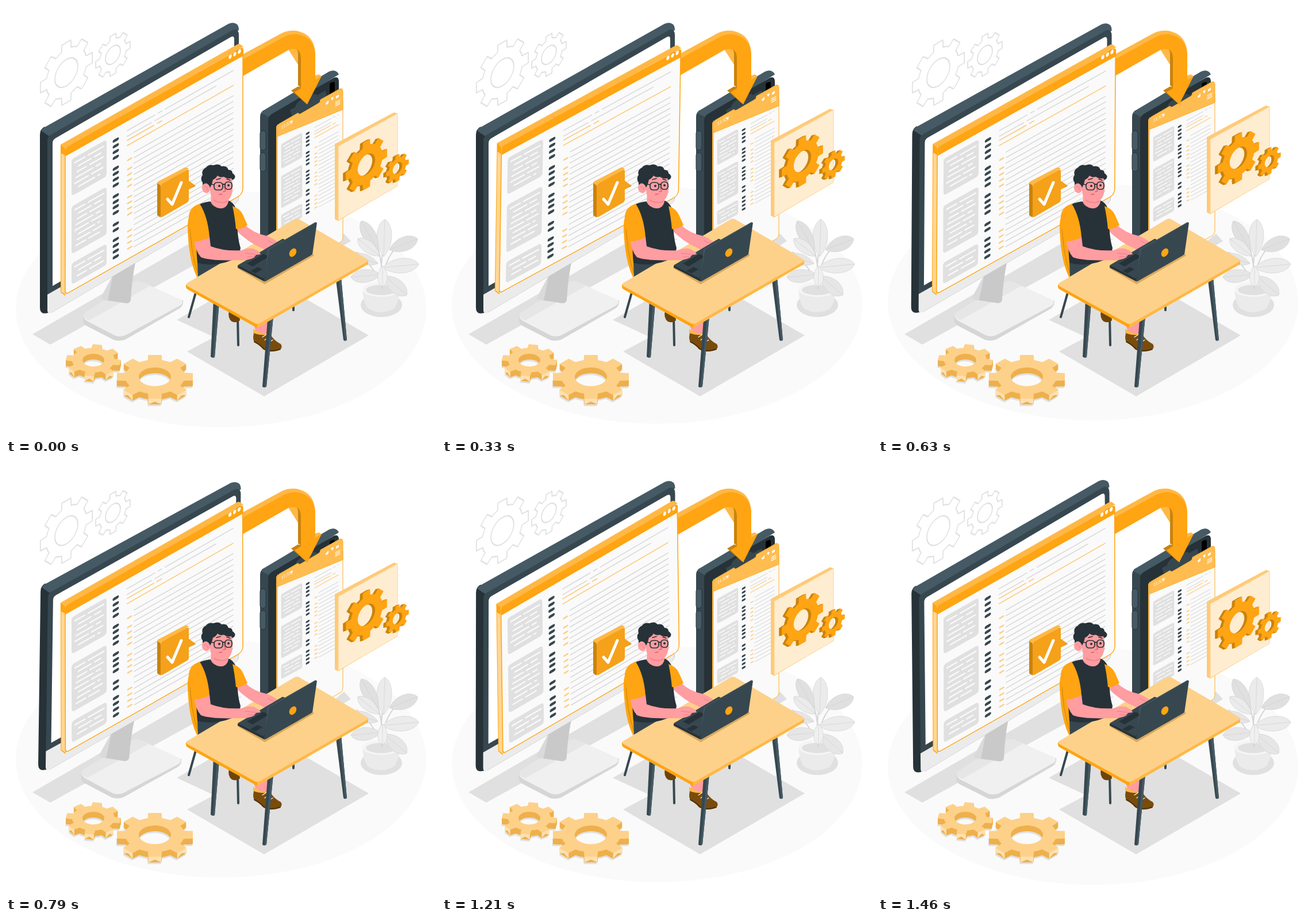
An HTML page for the animation above (1.5 s loop, 748x748 px).

```html
<!DOCTYPE html>
<html lang="en">
<head>
<meta charset="utf-8">
<title>Responsive page</title>
<style>
html, body { margin: 0; width: 100%; height: 100%; overflow: hidden; background: #fff }
svg { display: block; width: 100%; height: 100% }
.o { fill: #ffa412 } .l { fill: #ffb846 } .b { fill: #c9830f }
.d { fill: #263238 } .m { fill: #37474f } .t { fill: #455a64 }
.s { fill: #ff9da1 } .g { fill: #e0e0e0 } .p { fill: #fafafa }
.line { fill: none; stroke-linecap: round; stroke-linejoin: round }
</style>
</head>
<body>
<svg viewBox="0 0 748 748">
  <ellipse class="p float" cx="374" cy="527" rx="357" ry="206"/>
  <g id="outlines" fill="#fff" stroke="#e0e0e0" stroke-width="2" stroke-linejoin="round"></g>

  <g class="g">
    <path d="M46 571L340 401 410 405 77 589z"/>
    <path d="M297 546L405 484 500 497 631 573 449 679 315 601 362 576z"/>
    <path d="M560 420L588 396 600 409 575 424z"/>
  </g>

  <g id="monitor">
    <path fill="#d6d6d6" d="M134 538v11q1 5 9 9l45 23q10 3 20-1l94-54q7-5 6-14z"/>
    <path fill="#f0f0f0" d="M137 534L221 481q8-4 17 0l65 29q8 5 0 11l-94 51q-10 5-20 1l-48-25q-10-7-4-14z"/>
    <path fill="#e6e6e6" d="M137 534L221 481q8-4 17 0l12 6-105 60q-14-5-8-13z"/>
    <path fill="#dadada" d="M186 468L165 507q-1 4 8 5l36 5q7 0 8-6 2-36 8-65z"/>
    <path fill="#c9c9c9" d="M186 468L177 512l32 5q7 0 8-6 2-36 8-65z"/>
    <path class="d" d="M59 224q0-10 8-14l9 12V533q-17 6-17-8z"/>
    <path class="t" d="M61 217q2-4 6-6L387 31q9-4 15 1 3 3 3 10L76 227z"/>
    <path class="m" d="M72 234q0-7 6-10L394 42q11-4 11 9V331q0 8-6 12L80 531q-8 4-8-4z"/>
    <path fill="#fff" d="M81 239q0-6 5-9L391 54q6-3 6 4V306L81 487z"/>
    <path fill="#ebebeb" d="M72 502L405 311v20q0 8-6 13L80 533q-8 4-8-4z"/>
    <path class="line" stroke="#ccc" stroke-width=".7" d="M80 533L399 344q6-5 6-13"/>
  </g>

  <path class="m" d="M442 193q0-7 5-11l20-4 10 300-35-40z"/>
  <path class="t" d="M444 186q1-3 5-5L562 114q12-5 17 5L459 194z"/>
  <path class="d" d="M456 199q0-7 6-11L570 125q9-4 9 7V398L456 470z"/>
  <path fill="#000" d="M563 142v-5q0-3 3-4l4-1q2 0 2 3v20l-9 5z"/>
  <path class="m" d="M494 181l9-5q2-8 9-12l17-9q8-4 12 0l15-8 2 13-60 34z"/>
  <g class="t" stroke="#263238">
    <rect x="442" y="217" width="10" height="34" rx="5"/>
    <rect x="442" y="255" width="10" height="33" rx="5"/>
  </g>

  <g class="float">
    <path class="l" d="M473 205l-3 5V470h5z"/>
    <path class="p" stroke="#ffb030" d="M472 224L586 165V403q0 5-4 8L472 475z"/>
    <path fill="#ffbc50" stroke="#ffae2c" d="M472 211q0-4 3-6l33-19q1 3 5 1l31-18q3-2 3-6l32-18q7-4 7 4v31L472 227z"/>
    <g id="phonePage" transform="matrix(.6 -.33 0 .68 472 226)"></g>
    <text transform="matrix(.866 -.48 0 1 479 214)" font-family="Lato, sans-serif" font-size="7.5" fill="#fff">11:53</text>
    <path fill="#fff" d="M493 202l6-4-2 8-1-4zM556 169l5-5v5l-4 3zM565 161q3-4 5-2l-2 5zM574 157l5-3v4l-5 3z"/>
    <path class="line" stroke="#fff" stroke-width="1.2" d="M573 168l8-4.500M573 171l8-4.500M573 174l8-4.500"/>
  </g>

  <path class="l" d="M403 89L480 47Q504 37 524 51 538 62 538 86L513 110 490 74 403 122z"/>
  <path class="b" d="M508 138V84q0-9-6-11l-6-1 12-6 8 12v66z"/>
  <path class="b" d="M496 147l12-7 8 2 9 29-4-2z"/>
  <path class="o" d="M403 98L485 53Q503 45 519 53 538 62 538 88V128l11-6-25 49-22-21 11-7V92Q513 70 492 76L403 127z"/>
  <path class="l" d="M538 121l6-2 5 3-11 6z"/>

  <g id="window">
    <path class="o" d="M95 241L103 246V504l-8-6z"/>
    <path fill="#ffd694" d="M96 256l7 4V502l-7-5z"/>
    <path class="l" d="M95 241L402 67q3-2 6 0l5 4-310 177z"/>
    <g transform="matrix(1 -.567 0 1 103 247)">
      <path class="p" stroke="#ffa412" stroke-width="1.500" d="M0 14H309V245q0 10-9 10H6q-6 0-6-6z"/>
      <path class="o" d="M0 14V4q0-4 4-4H305q5 0 5 5V15z"/>
      <g fill="#fff"><ellipse cx="287" cy="4" rx="2.700" ry="3.500"/><ellipse cx="295" cy="4" rx="2.700" ry="3.500"/><ellipse cx="303" cy="4" rx="2.700" ry="3.500"/></g>
      <g id="windowPage"></g>
    </g>
  </g>

  <path class="b" d="M263 308l6 3v57l-6-4zM318 306l12 7-12 6z"/>
  <path class="l" d="M263 308q0-2 2-3l46-24q3-1 7 2l-49 29z"/>
  <path fill="#f5a11a" d="M269 314q0-3 3-5l43-24q3-1 3 2v17l11 8-11 7v18q0 3-3 5l-43 25q-3 1-3-2z"/>
  <path class="line" stroke="#fff" stroke-width="5" d="M281 336l8 9 16-38"/>

  <g class="float">
    <path fill="#ffca78" d="M572 240L675 185l6 2V312l-103 62-6-3z"/>
    <path fill="#ffedd1" stroke="#ffd494" d="M578 244L681 187V313L578 373z"/>
    <g id="panelGears"></g>
  </g>

  <ellipse class="g" cx="653" cy="520" rx="36" ry="21"/>
  <path fill="#ebebeb" d="M620 492q2 28 11 35 21 11 43 0 9-9 12-35z"/>
  <ellipse fill="#f5f5f5" cx="653" cy="493" rx="33" ry="13"/>
  <ellipse class="g" cx="653" cy="494" rx="27" ry="9"/>
  <g id="plant"></g>
  <g id="floorGears"></g>

  <path class="line" stroke="#37474f" stroke-width="4" d="M333 488L318 541M403 540l1 50M500 515v14"/>
  <path class="o" d="M341 344Q314 352 316 390q2 45 12 72l6 14 38 8z"/>
  <path class="line" stroke="#c9830f" d="M320 366q-1 60 16 105"/>
  <path class="m" d="M333 446l74-14 12 42-55 24-30-27z"/>
  <path fill="#6d440b" d="M388 530q-3 13 5 19 8 3 14-2l-2-17z"/>
  <path class="s" d="M428 548l28-4-2 27-18-2z"/>
  <path class="l" d="M430 562l16 8 12-3-2 11-26-9z"/>
  <path fill="#7a4c0c" d="M431 569q-3 13 3 17 9 5 13 11 12 7 27 2 9-4 4-11-12-6-19-18-11 5-28-1z"/>
  <path class="line" stroke="#4f3208" stroke-width="2" d="M432 584q10 5 16 12 13 7 29 1"/>
  <path class="line" stroke="#fff" stroke-width="1.200" d="M446 576l9-6M450 581l9-6M455 586l9-5"/>

  <g class="m">
    <path d="M361 510l10 6-8 95q-4 2-7-1zM455 545l10-5-12 122q-4 3-7 0zM574 477l9-5 10 109q-3 3-6 0z"/>
    <path class="t" d="M367 512l4 2-8 97-3 1zM461 542l4-2-12 122-3 1zM579 475l4-3 10 109-3 1z"/>
  </g>
  <path class="o" d="M313 484l124 68v8L316 493q-3-2-3-5z"/>
  <path class="l" d="M437 552l193-110v7L437 560z"/>
  <path fill="#fdd18a" d="M315 482L502 371q4-2 8 0l118 69q3 3 0 5L441 552q-4 2-8 0L315 487q-3-3 0-5z"/>
  <path fill="#d9a95c" d="M402 456l48 28 86-50-6-7z"/>

  <path class="s" d="M399 389l17-8q14 14 38 19 11 4 20 12l-5 4-6-2-3 8q-8 5-15-1-23-9-46-32z"/>
  <path class="d" d="M403 452L482 405l5 3-34 70-4 1-46-24z"/>
  <path class="m" d="M403 451L481 405l5 3-38 66z"/>
  <path class="d" d="M419 448l29-17 9 5-28 17zM425 461l13-7 8 4-12 7z"/>
  <path class="d" d="M336 345q12-5 22-5 14 14 28-2 10 3 14 15 0 22 3 40 1 15 5 28l-3 15q-35 20-72 11-3-30 0-45z"/>
  <path class="s" d="M327 406l27-5 2 17q24 9 54 7 10-5 20-3 11 4 13 10l-8 1-4 5q-10 5-24 4-50 2-68-5-9-10-12-31z"/>
  <path class="line" stroke="#e87f87" d="M416 430l18 2M420 436l12 1M456 408l9 5"/>
  <path class="o" d="M337 344q-19 6-19 24 1 24 9 41 13 1 27-7-3-36-17-58zM394 348q14 5 18 15l8 18q-8 7-20 7-2-22-6-40z"/>
  <path class="s" d="M357 325l29 3 1 12q-3 13-15 12-12-2-16-11z"/>
  <path fill="#f48088" d="M361 336q12 6 25 1l-1 4q-13 4-23-2z"/>
  <path class="d" d="M354 319q-13 1-12-12-5-7 0-13-3-9 6-13 4-6 13-4 9-4 14 2 9-2 12 6 7 0 7 6 7 4 3 10l-9 4-30 2z"/>
  <path class="s" d="M357 302q-5 18 1 31 8 9 20 8 14-2 16-21 1-12-2-21l-27-5z"/>
  <path class="d" d="M353 319l3-19 10-10 26 2 3 7q-10 3-16-2-7 2-11-2-4 6-8 7-2 9-4 12z"/>
  <ellipse class="s" cx="348" cy="317" rx="7" ry="8.500" transform="rotate(-15 348 317)"/>
  <path class="line" stroke="#e87f87" d="M345 314q5 0 6 6"/>
  <g class="line" stroke="#263238" stroke-width="1.700">
    <rect x="362" y="307" width="15" height="13" rx="5"/><rect x="381" y="306" width="12" height="13" rx="5"/>
    <path d="M377 311q2-2 4 0M362 311l-9-2M366 302l7-2M384 301l6 2"/>
  </g>
  <circle class="d" cx="371" cy="313" r="2"/><circle class="d" cx="387" cy="312" r="2"/>
  <path class="line" stroke="#d85f6a" stroke-width="1.300" d="M379 314l3 8-4 1M371 328l5-1"/>

  <path class="t" d="M455 426q0-3 3-4L538 376l3 1-8 55-83 47z"/>
  <path class="m" d="M457 426q0-2 3-4L537 378q4-2 3 2l-7 50q0 2-3 4L453 478q-4 2-4-1z"/>
  <ellipse class="o" cx="499" cy="429" rx="5.500" ry="8" transform="rotate(32 499 429)"/>
</svg>
<script>
const $ = id => document.getElementById(id);
const fill = (id, ...parts) => $(id).innerHTML = parts.flat().join('');
const times = (n, make) => Array.from({ length: n }, (_, i) => make(i));
const TEETH = 8, TIP = .17, BASE = .24;

function gearPath(radius, hole, turn = 0) {
  const at = (r, a) => `${(r * Math.sin(a)).toFixed(1)} ${(-r * Math.cos(a)).toFixed(1)}`;
  const root = radius * .77;
  const arc = a => `A${root} ${root} 0 0 1 ${at(root, a)}`;
  let d = 'M' + at(root, turn - BASE);
  for (let i = 0; i < TEETH; i++) {
    const a = turn + i * 2 * Math.PI / TEETH;
    if (i) d += arc(a - BASE);
    d += `L${at(radius, a - TIP)} ${at(radius, a + TIP)} ${at(root, a + BASE)}`;
  }
  d += arc(turn - BASE) + 'Z';
  return d + `M${hole} 0A${hole} ${hole} 0 1 0 ${-hole} 0A${hole} ${hole} 0 1 0 ${hole} 0Z`;
}

const gear = (plane, x, y, d, color = '') =>
  `<path fill-rule="evenodd" transform="matrix(${plane} ${x} ${y})" d="${d}" ${color && `fill="${color}"`}/>`;

// Stacks copies along (dx, dy) to give the gear its thickness.
const extrude = (plane, x, y, d, side, depth, dx, dy) =>
  times(depth, i => gear(plane, x + dx * (depth - i), y + dy * (depth - i), d, side));

// Light end faces of the teeth that point to the viewer.
const toothFaces = (x, y, radius, turn, depth) => times(TEETH, i => {
  const a = turn + i * 2 * Math.PI / TEETH;
  if (Math.cos(a) > -.5) return '';
  const at = b => `${x + radius * Math.sin(b)} ${y - .577 * radius * Math.cos(b)}`;
  return `<path fill="#fee0b0" d="M${at(a - TIP)}L${at(a + TIP)}v${depth}L${at(a - TIP)}v${depth}L${at(a + TIP)}v${depth}z"/>`;
});

const wall = '.866 -.5 0 1', ground = '1 0 0 .577';
fill('outlines',
  gear(wall, 105, 116, gearPath(53, 23)),
  gear(wall, 186, 85, gearPath(35, 15)));
fill('panelGears', [[627, 276, 42, 17.5], [681, 282, 23, 9.5]].map(([x, y, r, hole]) => {
  const d = gearPath(r, hole);
  return extrude(wall, x, y, d, '#c9830f', 5, -1, .3).join('') + gear(wall, x, y, d, '#ffa412');
}));
fill('floorGears', [[152, 616, 48, 19, .15], [259, 645, 67, 28, 0]].map(([x, y, r, hole, turn]) => {
  const d = gearPath(r, hole, turn);
  return [gear(ground, x - 1, y + 13, d, '#e0e0e0'),
    ...extrude(ground, x, y, d, '#eeb04c', 10, 0, 1),
    ...toothFaces(x, y, r, turn, 10),
    gear(ground, x, y, d, '#fdd18a')].join('');
}));

const leaf = (x, y, tipX, tipY, width, color) => {
  const length = Math.hypot(tipX - x, tipY - y);
  const angle = Math.atan2(tipY - y, tipX - x) * 180 / Math.PI;
  return `<path transform="translate(${x} ${y}) rotate(${angle})" fill="${color}" stroke="#d2d2d2" stroke-width=".7"
    d="M0 0C${length * .3} ${-width} ${length * .85} ${-width} ${length} 0C${length * .85} ${width} ${length * .3} ${width} 0 0H${length}"/>`;
};
fill('plant',
  '<path class="line" stroke="#d5d5d5" stroke-width="2" d="M654 492Q657 450 644 412M654 488Q650 440 660 405M654 480Q660 430 690 412M654 485Q630 440 610 428"/>',
  leaf(657, 436, 659, 371, 17, '#ebebeb'), leaf(647, 425, 618, 374, 15, '#e0e0e0'),
  leaf(667, 424, 716, 405, 16, '#e0e0e0'), leaf(650, 435, 612, 405, 13, '#ebebeb'),
  leaf(647, 448, 602, 434, 12, '#e6e6e6'), leaf(655, 455, 718, 449, 17, '#ebebeb'),
  leaf(652, 467, 600, 472, 15, '#e6e6e6'), leaf(659, 470, 697, 503, 16, '#e6e6e6'),
  leaf(655, 452, 655, 488, 11, '#f0f0f0'));

const stroke = (color, width, d) =>
  `<path class="line" stroke="${color}" stroke-width="${width}" d="${d}"/>`;
const rows = (ys, from, to) => ys.map(y => `M${from} ${y}H${to}`).join('');

function page(end) {
  const block = (y, height) => {
    const count = Math.floor((height - 8) / 9);
    const text = times(count, i => {
      const from = 17 + i * 7 % 4 * 2, gap = 34 + i * 11 % 19, ly = y + 9 + i * 9;
      return `M${from} ${ly}H${gap}M${gap + 6} ${ly}H${67 - i * 5 % 9}`;
    }).join('');
    return `<rect class="g" x="11" y="${y}" width="61" height="${height}" rx="5"/>` + stroke('#fafafa', 2.6, text);
  };
  const labels = [36, 46, 56, 66, 85, 94, 104, 114, 133, 143, 152, 162, 182, 192, 209, 219, 229, 239];
  const marks = [83, 99, 109, 119, 129, 148, 158, 168, 178, 207, 217, 227, 237];
  return block(26, 64) + block(108, 83) + block(207, 37) +
    stroke('#37474f', 5, rows(labels, 85, 91)) +
    stroke('#fdd08a', 3, rows(marks, 109, 115)) +
    stroke('#d9d9d9', 1.8, rows(times(18, i => 75 + i * 9.7), 120, end) +
      `M108 31H156M162 31H168M174 31H${end}M108 41H150M156 41H${end - 30}`) +
    stroke('#fdc978', 1.8, `M108 48H154M160 48H168M108 57H${end}`);
}
fill('windowPage', page(292));
fill('phonePage', page(177));

const LOOP = 1500;
// Sways to +1 at a quarter, -1 at three quarters, linearly.
const sway = p => p < .25 ? 4 * p : p < .75 ? 2 - 4 * p : 4 * p - 4;
const floats = document.querySelectorAll('.float');
function draw(now) {
  const t = now % LOOP;
  const lift = 14.3 * (1 - Math.abs(1 - t / (LOOP / 2)));
  floats.forEach(el => el.setAttribute('transform', `translate(0 ${-lift})`));
  $('window').setAttribute('transform', `rotate(${sway(t / LOOP)} 254 285)`);
  $('monitor').setAttribute('transform', `rotate(${sway(Math.max(0, t - 500) / LOOP)} 233 306)`);
  requestAnimationFrame(() => draw(performance.now()));
}
draw(performance.now());
</script>
</body>
</html>
```
